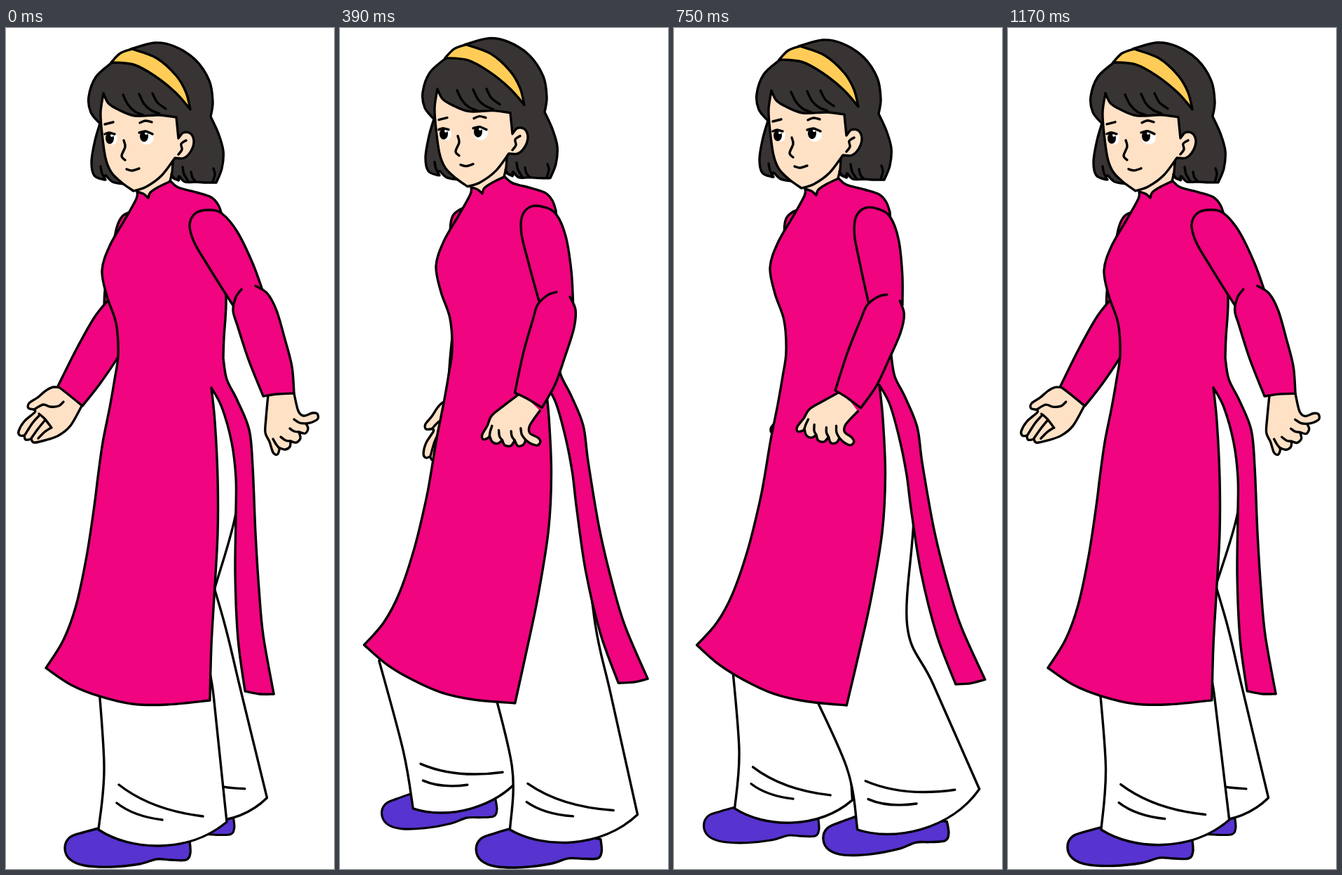
An HTML page for the animation above (1.2 s loop, 468 by 1197 pixels).

```html
<!DOCTYPE html>
<html lang="en">
<head>
<meta charset="utf-8">
<title>Walk cycle</title>
<style>
html, body { margin: 0; width: 100%; height: 100%; overflow: hidden; background: #fff; }
svg { display: block; width: 100vw; height: 100vh; }
path { stroke: #000; stroke-width: 3.4; stroke-linecap: round; stroke-linejoin: round; }
</style>
</head>
<body>
<svg id="stage" viewBox="0 0 468 1197" xmlns="http://www.w3.org/2000/svg"></svg>
<script>
const LOOP = 1200, STEP = 30;
const PINK = '#f0047f', SKIN = '#ffe1c6', HAIR = '#383434', GOLD = '#ffcd57', SHOE = '#5733cf';
const stage = document.getElementById('stage');

// "x,y x,y | x,y": smooth runs joined by corners at each bar
const parse = s => s.split('|').map(run => run.trim().split(/\s+/).map(p => p.split(',').map(Number)));

// Catmull-Rom run, continuing from its first point
function run(p) {
  let d = '';
  for (let i = 0; i < p.length - 1; i++) {
    const a = p[i - 1] || p[i], b = p[i], c = p[i + 1], e = p[i + 2] || c;
    const h = j => [b[j] + (c[j] - a[j]) / 6, c[j] - (e[j] - b[j]) / 6, c[j]];
    const x = h(0), y = h(1);
    d += 'C' + x.map((v, j) => v.toFixed(2) + ' ' + y[j].toFixed(2)).join(' ');
  }
  return d;
}

function outline(runs) {
  let last = null, d = 'M' + runs[0][0].join(' ');
  for (const r of runs) {
    d += run(last ? [last, ...r] : r);
    last = r[r.length - 1];
  }
  return d;
}

function node(parent, tag, attrs = {}) {
  const n = document.createElementNS(stage.namespaceURI, tag);
  for (const k in attrs) n.setAttribute(k, attrs[k]);
  return parent.appendChild(n);
}
const group = parent => node(parent, 'g');
const shape = (parent, s, fill = 'none') => node(parent, 'path', { d: s ? outline(parse(s)) : '', fill });
const lines = (parent, ...list) => list.forEach(s => shape(parent, s));
const spot = (parent, cx, cy, rx, ry, fill) => node(parent, 'ellipse', { cx, cy, rx, ry, fill });
const turn = (n, deg, x, y) => n.setAttribute('transform', `rotate(${deg.toFixed(3)} ${x} ${y})`);

// ---- layers, back to front
const back = group(stage), legs = group(stage), body = group(stage);

// far arm
const farUpper = group(back);
shape(farUpper, '190,262 178,262 166,268 158,284 152,315 146,350 141,375 140,400 | 175,400 205,300', PINK);
const farFore = group(farUpper), farHand = group(farFore);
shape(farHand, '84,513 68,511 57,516 45,526 33,534 32,541 40,543 | 41,547 26,560 18,574 20,580 26,580 | 28,586 36,585 | 40,590 55,587 75,580 92,566 108,538', SKIN);
lines(farHand, '40,543 53,536 63,539 75,538 82,532', '47,552 38,562 27,579', '55,559 46,570 36,584', '47,549 55,556 65,569', '64,569 55,575 46,584');
shape(farFore, '145,388 126,412 100,458 74,510 | 92,524 109,538 | 135,505 165,460 190,410', PINK);

// legs
function makeLeg() {
  const g = group(legs), shoe = group(g);
  shape(shoe, '140,1137 110,1145 91,1152 84,1167 91,1183 112,1192 150,1194 190,1190 215,1183 235,1184 257,1184 263,1174 262,1157 | 200,1145 140,1137', SHOE);
  return { shoe, cloth: shape(g, '', '#fff'), folds: shape(g, '') };
}
const farLeg = makeLeg(), nearLeg = makeLeg();

// head
const head = group(body);
shape(head, '150,50 128,70 118,98 121,120 134,136 | 127,160 122,190 126,210 140,216 | 142,210 152,219 168,222 | 182,200 220,200 | 234,211 246,217 | 247,211 255,219 270,219 | 285,220 300,220 | 308,200 310,175 303,150 292,126 | 295,105 290,75 270,45 240,26 212,21 178,30 | 150,50', HAIR);
node(head, 'path', { d: 'M187 226V236L203 244L237 220L238 188Z', fill: SKIN, style: 'stroke:none' });
shape(head, '139,93 135,120 137,150 142,185 150,205 165,220 182,232 | 200,226 222,210 241,185 | 254,185 264,175 268,161 263,150 253,149 246,157 | 243,127 | 218,124 184,125 160,116 146,107 139,93', SKIN);
shape(head, '150,49 163,36 180,30 | 215,43 243,68 257,92 263,116 | 242,92 212,68 182,52 150,49', GOLD);
lines(head, '167,95 174,109 184,119 196,124', '190,94 197,108 207,117 219,122', '209,93 216,106 228,115',
  '135,197 137,207 142,216', '236,208 240,214 247,216', '252,198 254,208 260,218', '264,205 266,213 271,219', '296,200 298,208 295,219',
  '238,190 237,205 234,218', '257,160 250,165 251,173 246,180',
  '141,137 153,134', '191,135 199,132 208,134', '168,160 170,169 165,182 170,188', '172,201 180,203 190,200');
spot(head, 152, 157, 7, 9, '#fff');
spot(head, 201, 156, 10, 10, '#fff');
for (const [x, y] of [[148, 157], [197, 154]]) {
  spot(head, x, y, 6, 8, '#000');
  spot(head, x + 3, y - 4, 2, 2, '#fff');
}
lines(head, '141,151 147,149 155,151', '190,149 199,147 209,151');

// dress: hanging back panel, front panel, bodice
const dress = shape(body, '', PINK);
const PANEL = parse('310,470 315,500 330,530 347,572 352,625 356,720 361,800 367,865 382,948 | 362,948 341,944 | 331,870 327,780 328,690 328,640 322,590 308,540 293,512');
const FRONT = parse('298,560 302,640 302,720 297,810 293,880 291,957 | 230,963 180,962 133,951 93,935 57,911 | 82,871 100,822 115,752 126,680 131,640 138,590 148,540 155,500 160,465 157,420 144,382 137,345 148,310 170,272 186,243 187,233 | 196,236 203,242 | 206,234 218,226 235,218 | 246,227 272,234 293,241 303,252 308,266 | 312,330 314,392 311,440 310,470');

// near arm
const upper = group(body);
shape(upper, '326,398 308,370 288,338 269,306 262,281 270,264 289,259 308,264 330,290 352,335 367,376', PINK);
const fore = group(upper), hand = group(fore);
shape(hand, '374,522 371,555 370,576 376,589 381,604 387,607 390,600 389,597 | 398,600 405,596 406,588 | 414,590 420,584 418,575 | 427,577 431,570 428,563 | 437,561 445,556 444,549 437,548 425,552 417,545 411,520', SKIN);
lines(hand, '389,597 385,592 381,585', '406,588 399,587 392,582', '418,575 411,574 405,570', '428,563 419,562 411,557');
shape(fore, '336,372 328,383 324,402 330,423 346,472 367,524 | 388,521 411,520 | 408,482 398,443 386,402 373,378 356,367', PINK);

// ---- motion
const cosAt = t => Math.cos(2 * Math.PI * t / LOOP);

// lower cloth swings further than upper cloth
function swayPanel([x, y], k) {
  const u = Math.max(0, (y - 590) / 358) ** 1.4 * k;
  return [x + 72 * u, y - (7 + 0.3 * (x - 341)) * u];
}
function swayFront([x, y], k) {
  const w = (291 - x) / 234;
  const u = Math.max(0, (y - 600) / 357) ** (2 - 0.7 * w) * k;
  return [x - (52 - 18 * w) * u, y + (13 - 53 * w) * u];
}

// the far leg is the near one, smaller and half a loop later
function drawLeg(leg, t, far) {
  const size = far ? 0.918 : 1, ox = far ? -55 : 0, oy = far ? 63.5 : 0;
  const c = cosAt(t), behind = (1 - c) / 2;
  const pulse = Math.max(0, cosAt(t + LOOP / 4));
  const swing = pulse * pulse * (3 - 2 * pulse);

  const shoeX = 161 - 76 * c;
  const tilt = -4.5 * behind - 14 * swing;
  const place = (x, y) => [x * size + ox, y * size + oy];
  const offset = (o, x, y, deg) => {
    const r = deg * Math.PI / 180, cs = Math.cos(r) * size, sn = Math.sin(r) * size;
    return [o[0] + x * cs - y * sn, o[1] + x * sn + y * cs];
  };
  const hem = (o, x, y) => offset(o, x, y, tilt).map(v => v.toFixed(2)).join(' ');

  const front = place(shoeX + 47, 1141);
  const shin = offset(front, 8, -90, tilt);
  const shinTop = offset(front, -2, -235, 0.8 * tilt - 9 * behind * behind);
  const rear = offset(front, 183, -11, tilt);
  const knee = place(335 - 50 * cosAt(t + 30) - 40 * swing + (far ? 14 : 0), 850);
  const thigh = place(340 - 12 * c - 8 * swing, 690);
  if (far) rear[1] += 8 * Math.max(0, -c);
  const calf = knee.map((v, i) => v + 0.36 * (rear[i] - v));

  leg.cloth.setAttribute('d', outline([[shinTop, shin, front]])
    + `C${hem(front, 45, 30)} ${hem(rear, -55, 46)} ${rear.join(' ')}`
    + run([rear, calf, knee, thigh, place(330, 580)])
    + `L${place(306, 500).join(' ')}L${place(260, 500).join(' ')}Z`);
  leg.folds.setAttribute('d',
    `M${hem(front, 29, -64)}Q${hem(front, 75, -28)} ${hem(front, 149, -19)}`
    + `M${hem(front, 26, -38)}Q${hem(front, 50, -19)} ${hem(front, 91, -14)}`);
  leg.shoe.setAttribute('transform', `translate(${ox} ${oy}) scale(${size}) `
    + `translate(${shoeX - 85} ${-25 * swing}) rotate(${-2 * behind - 4 * swing} 170 1180)`);
}

function draw(t) {
  const k = (1 - cosAt(t)) / 1.891;
  const sway = (1 - cosAt(t + 15)) / 1.92;
  const bob = `translate(0 ${(4 * cosAt(2 * t) - 4).toFixed(3)})`;
  back.setAttribute('transform', bob);
  body.setAttribute('transform', bob);

  dress.setAttribute('d', outline([
    ...PANEL.map(r => r.map(p => swayPanel(p, sway))),
    ...FRONT.map(r => r.map(p => swayFront(p, sway)))
  ]) + 'Z');

  turn(upper, 22 * k, 282.5, 270);
  turn(fore, 22.2 * k, 346, 385);
  turn(hand, 17.8 * k, 389, 522);
  turn(farUpper, -19.5 * k, 185, 290);
  turn(farFore, -10.5 * k, 160, 400);
  turn(farHand, 8 * k, 91, 524);

  drawLeg(farLeg, t + LOOP / 2, true);
  drawLeg(nearLeg, t, false);
}

const start = performance.now();
function tick() {
  const ms = Math.max(0, performance.now() - start);
  draw(Math.floor(ms / STEP) * STEP % LOOP);
  requestAnimationFrame(tick);
}
tick();
</script>
</body>
</html>
```
